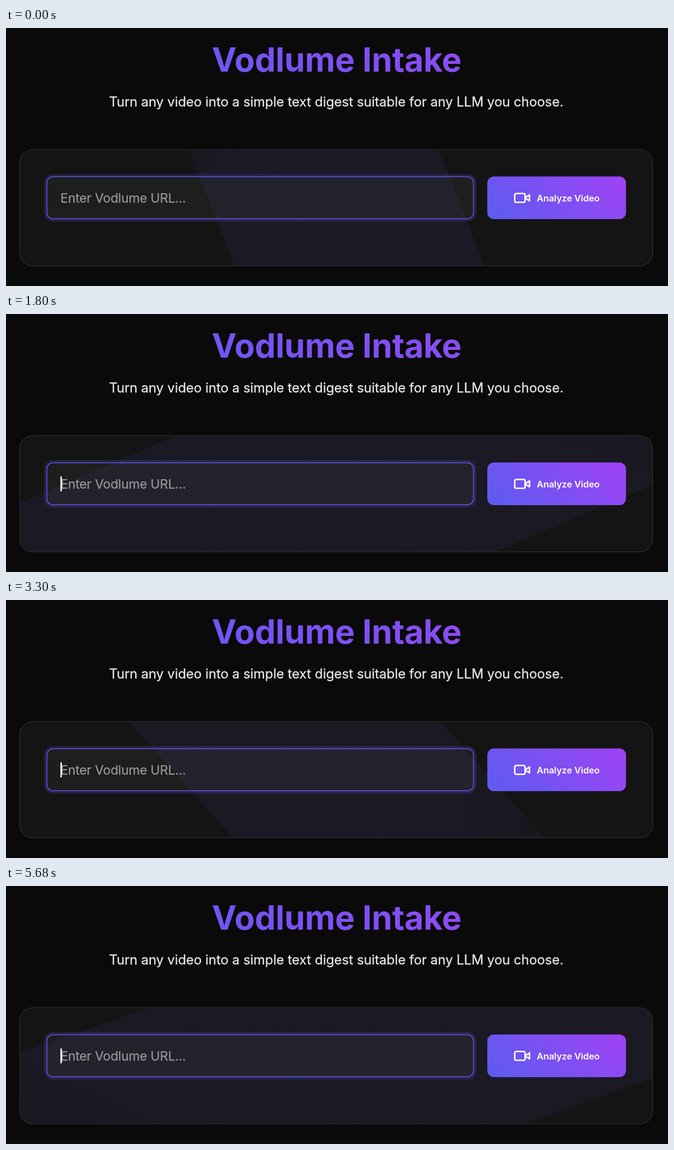
These frames come from a looping animation (1198x467 px, 5700 ms). An HTML page:

```html
<!DOCTYPE html>
<html lang="en">
<head>
<meta charset="utf-8">
<title>Vodlume Intake</title>
<style>
  html, body { margin: 0; width: 100%; height: 100%; overflow: hidden; background: #0a0a0a; }
  svg { display: block; width: 1198px; height: 467px; }
  text { font-family: Inter, sans-serif; font-optical-sizing: none; }
  .title { font-size: 60px; font-weight: 700; letter-spacing: -.2px; fill: url(#titleFill); }
  .lead { font-size: 24px; letter-spacing: -.05px; fill: #e8e8e8; stroke: #e8e8e8; stroke-width: .3px; }
  .hint { font-size: 23px; letter-spacing: -.15px; fill: #989898; stroke: #989898; stroke-width: .25px; }
  .label { font-size: 16.5px; font-weight: 600; letter-spacing: -.1px; fill: #fff; }
  .icon { fill: none; stroke: #fff; stroke-width: 2; stroke-linecap: round; stroke-linejoin: round; }

  .beam { transform-origin: 0 0; animation: spin 5.7s linear infinite; }
  .caret { fill: #fff; animation: blink 5.7s step-end infinite; }

  @keyframes spin {
    0% { transform: rotate(68.4deg); }
    21.05% { transform: rotate(127.5deg); }
    31.58% { transform: rotate(156.8deg); }
    45.26% { transform: rotate(193.5deg); }
    57.89% { transform: rotate(228.2deg); }
    78.25% { transform: rotate(282.4deg); }
    99.65% { transform: rotate(340.8deg); }
    100% { transform: rotate(341.7deg); }
  }
  /* 600 ms on, 600 ms off, first shown at 560 ms */
  @keyframes blink {
    0%, 20.35%, 41.4%, 62.46%, 83.51% { opacity: 0; }
    9.82%, 30.88%, 51.93%, 72.98%, 94.04% { opacity: 1; }
    100% { opacity: 0; }
  }
</style>
</head>
<body>
<svg viewBox="0 0 1198 467" xmlns="http://www.w3.org/2000/svg">
  <defs>
    <linearGradient id="titleFill" gradientUnits="userSpaceOnUse" x1="292.75" y1="364.75" x2="902.25" y2="-244.75">
      <stop offset="0" stop-color="#5b5cf2"/>
      <stop offset="1" stop-color="#a044f5"/>
    </linearGradient>
    <linearGradient id="buttonFill" gradientUnits="userSpaceOnUse" x1="914.25" y1="389.25" x2="1078.75" y2="224.75">
      <stop offset="0" stop-color="#5b5cf0"/>
      <stop offset="1" stop-color="#a142f4"/>
    </linearGradient>
    <linearGradient id="beamFill" gradientUnits="userSpaceOnUse" x1="-677" y1="677" x2="677" y2="-677">
      <stop offset=".18" stop-color="#6a5af0" stop-opacity="0"/>
      <stop offset=".38" stop-color="#6a5af0" stop-opacity=".07"/>
    </linearGradient>
    <clipPath id="cardClip"><rect x="25" y="220.5" width="1145" height="209.5" rx="23"/></clipPath>
  </defs>

  <text class="title" x="598.5" y="79" text-anchor="middle">Vodlume Intake</text>
  <text class="lead" x="597.7" y="141.5" text-anchor="middle">Turn any video into a simple text digest suitable for any LLM you choose.</text>

  <rect x="24.75" y="220.25" width="1145.5" height="210.25" rx="23.5" fill="#141414"/>
  <g clip-path="url(#cardClip)">
    <g transform="translate(598.3 325)">
      <rect class="beam" x="-1145" y="-210.2" width="2290" height="420.4" fill="url(#beamFill)"/>
    </g>
  </g>
  <rect x="24.75" y="220.25" width="1145.5" height="210.25" rx="23.5" fill="none" stroke="#282828" stroke-width="1.5"/>

  <rect x="71" y="266.4" width="778" height="81.8" rx="14" fill="none" stroke="#635bf1" stroke-opacity=".2" stroke-width="4.4"/>
  <rect x="74" y="269.3" width="772" height="76" rx="11" fill="#fff" fill-opacity=".045" stroke="#6357ee" stroke-width="1.5"/>
  <text class="hint" x="98.6" y="316.3">Enter Vodlume URL...</text>
  <rect class="caret" x="98.5" y="294" width="2.5" height="27"/>

  <rect x="871" y="268.7" width="251" height="77.2" rx="12" fill="url(#buttonFill)"/>
  <g class="icon" transform="translate(918 291.5) scale(1.333)">
    <path d="M22 8l-6 4 6 4z"/>
    <rect x="2" y="6" width="14" height="12" rx="2"/>
  </g>
  <text class="label" x="960.5" y="314">Analyze Video</text>
</svg>
</body>
</html>
```
